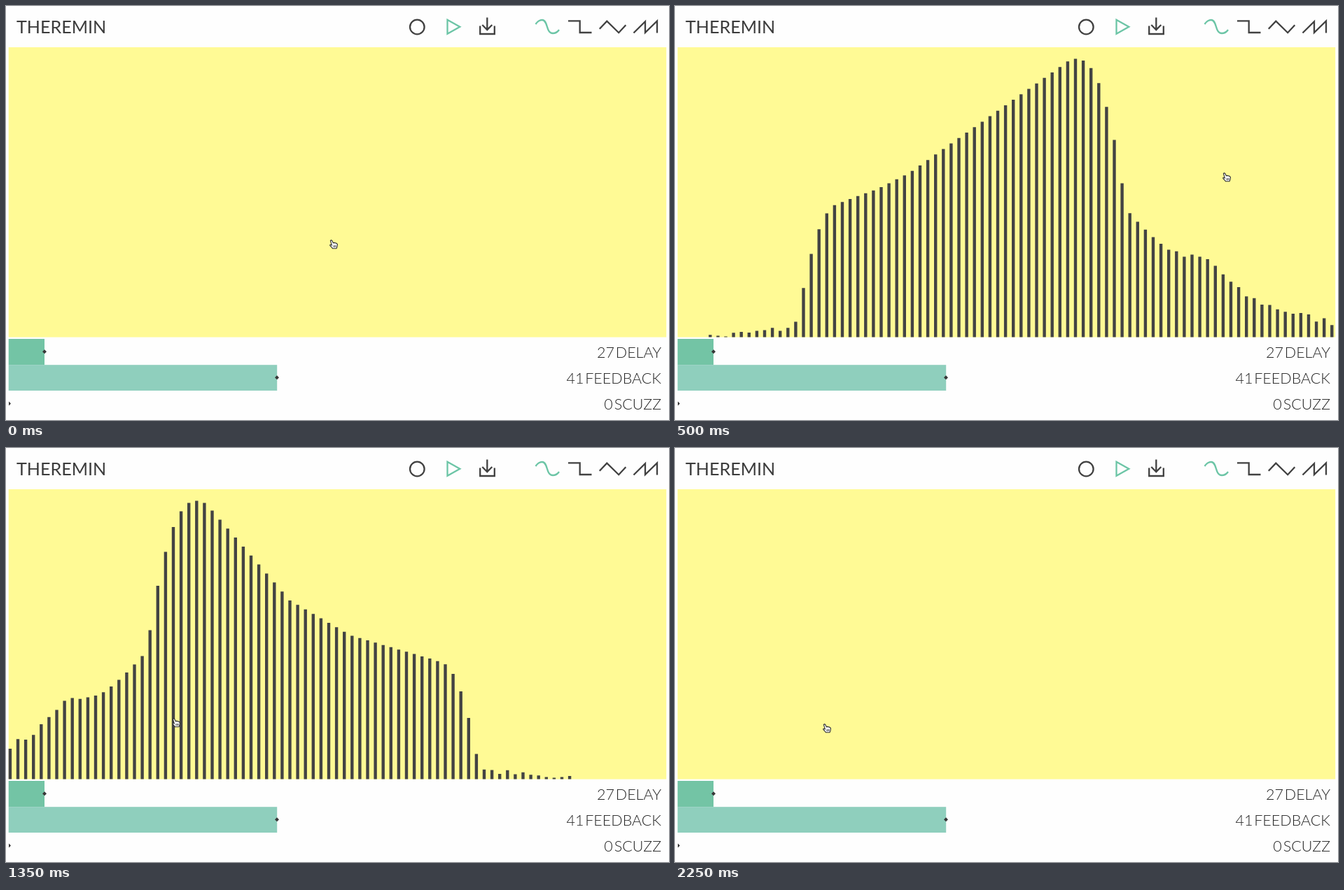
An HTML page for the animation above (2.3 s loop, 947x592 px).

```html
<!DOCTYPE html>
<html lang="en">
<head>
<meta charset="utf-8">
<title>Theremin</title>
<style>
  html, body { margin: 0; width: 100%; height: 100%; overflow: hidden; background: #fefefe; }
  svg { display: block; width: 100%; height: 100%; }
  text { font-family: Lato, sans-serif; fill: #3c3c3c; }
  .title { font-size: 25.1px; }
  .label { font-size: 21.5px; font-weight: 300; text-anchor: end; word-spacing: -4px; fill: #262626; }
  .icons { fill: none; stroke: #414141; stroke-width: 2.3; }
  .icons .on { stroke: #6cc5a6; }
</style>
</head>
<body>
<svg viewBox="0 0 947 592">
  <rect width="947" height="592" fill="#fefefe"/>
  <text class="title" x="15" y="39">THEREMIN</text>
  <g class="icons">
    <circle cx="587.3" cy="30" r="10.3"/>
    <path class="on" d="M630.5 19.8 L648.3 29.8 L630.5 39.8 Z"/>
    <path d="M687.3 16.5 V33.5 M680.3 27 L687.3 34 L694.3 27 M677.2 28.5 V40 H697.8 V28.5"/>
    <path class="on" d="M756.5 26 C759.5 21.5 763 19.8 766 20 C774.5 20.5 771 39 781 39 C785 39 788 37 790 34"/>
    <path d="M803 21.3 H819.7 V38 H836.5"/>
    <path d="M847.8 32.8 L858.3 21.6 L875.2 38.2 L885.3 27.2"/>
    <path d="M896.5 38.5 L913 22.3 V38 L930 21.5 V38.5"/>
  </g>
  <rect x="3.7" y="59" width="939.5" height="414.6" fill="#fffa95"/>
  <path id="bars" fill="#434343"/>
  <rect x="3.7" y="476" width="51.3" height="37.3" fill="#73c4a5"/>
  <rect x="3.7" y="513.2" width="383.5" height="36.8" fill="#8fcfbd"/>
  <path fill="#383838" d="M52 494.3 l3 -3 l3 3 l-3 3 z M384 531.3 l3 -3 l3 3 l-3 3 z M4 565.5 l3 3 l-3 3 z"/>
  <text class="label" x="936" y="502.7">27 DELAY</text>
  <text class="label" x="936" y="539.7">41 FEEDBACK</text>
  <text class="label" x="936" y="576.7">0 SCUZZ</text>
  <g id="hand" stroke="#2c2c2c" stroke-linejoin="round" stroke-linecap="round">
    <path fill="#fff" stroke-width="1.1" d="M-4.6 -5.4 C-3.8 -6.6 -2.6 -6.2 -2 -5 L-.6 -2 C.2 -3 1.4 -2.8 1.8 -1.9 C2.6 -2.6 3.6 -2.2 3.9 -1.3 C4.8 -1.5 5.4 -.8 5.4 .4 C5.5 2.5 5 4 4 5.8 H-1.6 C-2.2 4.2 -4 3.2 -5.2 1.4 C-5.6 .4 -4.4 -.2 -3.4 .6 L-2.6 1.2 Z"/>
    <path fill="none" stroke-width=".8" d="M-.2 1.6 V3.8 M1.5 1.5 V3.8 M3.2 1.4 V3.7"/>
  </g>
</svg>
<script>
const LOOP = 2300, STEP = 50, SUB = 5;
const COUNT = 85, PITCH = 11.1, LEFT = 3.7, BASE = 473.6;
const ATTACK = 50, RELEASE = 1350;
const FALL = 0.458; // px per ms

// Time, bar index of the tone
const tone = [[50, 21], [100, 26.5], [150, 30.6], [500, 51.1], [600, 54.8],
  [850, 54.8], [934, 43], [1050, 34.7], [1350, 24]];

// Time, x, y of the pointer
const path = [[0, 468, 341], [150, 600, 270], [400, 800, 240], [500, 788, 245],
  [1050, 341, 285], [1350, 243, 393], [1850, 221, 408], [2200, 217, 409], [2250, 217, 401]];

// Linear interpolation between key points
function at(points, t, axis = 1) {
  const k = points.findIndex(p => p[0] >= t);
  if (k < 0) return points[points.length - 1][axis];
  if (k === 0) return points[0][axis];
  const a = points[k - 1], b = points[k];
  return a[axis] + (b[axis] - a[axis]) * (t - a[0]) / (b[0] - a[0]);
}

let seed = 7;
function random() {
  seed = (seed * 16807) % 2147483647;
  return seed / 2147483647;
}
const grain = Array.from({ length: COUNT }, () => (random() - 0.5) * 10);

// Spectrum of one tone at distance d: a rounded core, a wide tail and a side lobe
function level(d, width) {
  const core = 398 - 3 * d ** 2.3;
  const lobe = 25 * Math.exp(-(((d - 17) / 3) ** 2));
  const tail = 300 * Math.exp(-d / width) - 12 + lobe;
  return Math.max(core, tail);
}

// Bars jump up to the spectrum and sink at a steady rate
function buildFrames() {
  const frames = [];
  let bars = Array(COUNT).fill(0);
  for (let t = 0; t < LOOP; t += SUB) {
    const sounding = t >= ATTACK && t <= RELEASE;
    const centre = at(tone, t);
    const width = 15 + 12 * Math.exp((ATTACK - t) / 60);
    bars = bars.map((h, i) => {
      const drive = sounding ? level(Math.abs(i - centre), width) : 0;
      const rough = drive > 0 && drive < 120 ? grain[i] : 0;
      return Math.max(0, h - FALL * SUB, drive + rough);
    });
    if (t % STEP === 0) frames.push(bars);
  }
  return frames;
}

const frames = buildFrames();
const barPath = document.getElementById("bars");
const hand = document.getElementById("hand");

function draw(time) {
  const n = Math.floor((time % LOOP) / STEP), t = n * STEP;
  let d = "";
  frames[n].forEach((h, i) => {
    if (h > 0.5) d += `M${(LEFT + i * PITCH).toFixed(1)} ${BASE}v${(-h).toFixed(1)}h4.4V${BASE}z`;
  });
  barPath.setAttribute("d", d);
  hand.setAttribute("transform", `translate(${at(path, t, 1)} ${at(path, t, 2)})`);
}

const began = performance.now();
function tick() {
  draw(performance.now() - began);
  requestAnimationFrame(tick);
}
draw(0);
requestAnimationFrame(tick);
</script>
</body>
</html>
```
